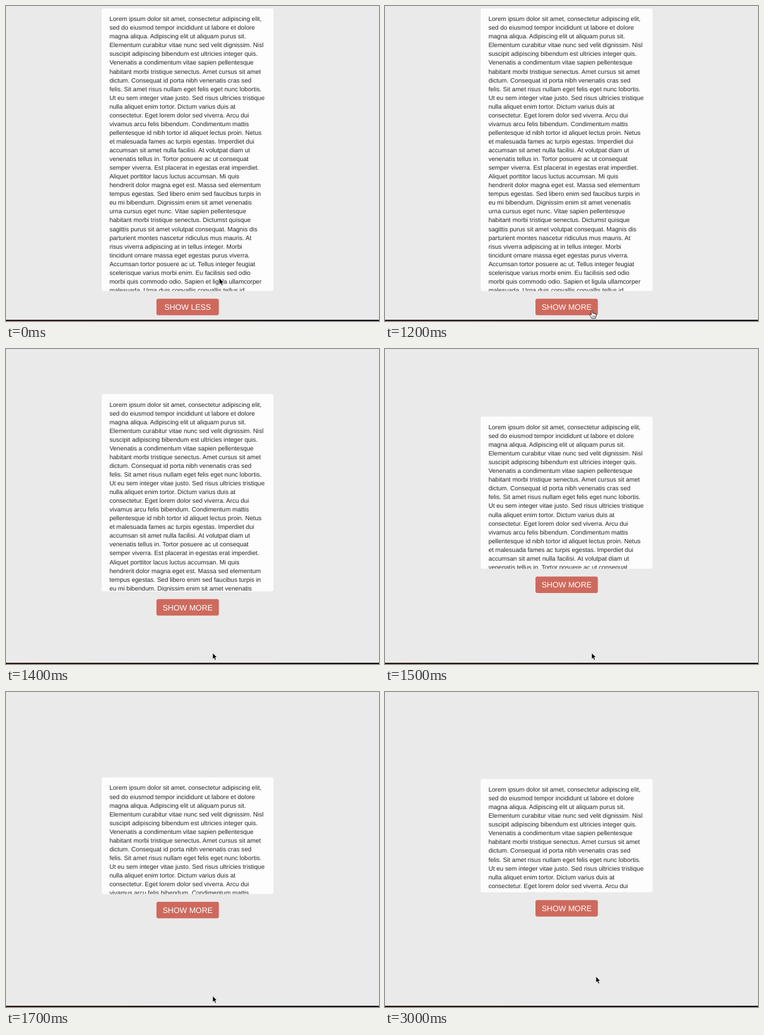
Recreate the animation shown at these times as an HTML page. Size 600 by 506 pixels, loop 3100 ms.

```html
<!DOCTYPE html>
<html lang="en">
<head>
<meta charset="utf-8">
<title>Show more / show less</title>
<style>
  html, body { margin: 0; width: 100%; height: 100%; overflow: hidden; background: #ebeaeb; }
  svg { display: block; width: 600px; height: 506px; }
  text { font-family: "Liberation Sans", Arial, sans-serif; text-rendering: geometricPrecision; }
  #lines { font-size: 10.05px; fill: #242424; }
  #label { font-size: 12.6px; fill: #fff; text-anchor: middle; }
</style>
</head>
<body>
<svg viewBox="0 0 600 506">
  <defs>
    <clipPath id="cardClip"><rect id="clipRect" x="154" width="276.3" rx="3"/></clipPath>
    <linearGradient id="edge">
      <stop offset="0" stop-color="#2b1714"/>
      <stop offset="1" stop-color="#121014"/>
    </linearGradient>
  </defs>
  <rect width="600" height="506" fill="#ebeaeb"/>
  <rect y="504" width="600" height="2" fill="url(#edge)"/>
  <rect id="card" x="154" width="276.3" rx="3" fill="#fefdfe"/>
  <g clip-path="url(#cardClip)"><g id="lines"></g></g>
  <g id="button">
    <rect x="242" width="100.4" height="26.5" rx="3" fill="#ce6a5d"/>
    <text id="label" x="292.2" y="17.7"></text>
  </g>
  <g id="cursor" stroke-linejoin="round">
    <path id="arrow" d="M0 0V10.4L2.4 8.2L4 12L5.9 11.2L4.3 7.5H7.4Z"
      fill="#000" stroke="#fff" stroke-width=".8"/>
    <g id="beam" fill="none">
      <path d="M-3-7Q0-7 0-5Q0-7 3-7M0-5V5M-3 7Q0 7 0 5Q0 7 3 7M-1.5 2H1.5" stroke="#fff" stroke-width="2"/>
      <path d="M-3-7Q0-7 0-5Q0-7 3-7M0-5V5M-3 7Q0 7 0 5Q0 7 3 7M-1.5 2H1.5" stroke="#222" stroke-width="1"/>
    </g>
    <g id="hand" stroke="#111" stroke-width=".9">
      <path d="M-1.1 7.2V.7Q-1.1-.5 0-.5T1.1 .7V4.4Q1.8 3.5 3 4.7Q4 4 4.9 5.2Q6.6 4.8 6.7 6.6V8.4Q6.6 10 5.5 11.2V12.5H-.4V11.6Q-2.2 9.6-3.9 7.1Q-4.4 5.9-3.2 5.7Q-2.2 5.7-1.1 7.2Z" fill="#fff"/>
      <path d="M1.3 8V10.7M3 8V10.7M4.6 8V10.7" stroke-width=".6"/>
    </g>
  </g>
</svg>
<script>
const LOOP = 3100, STEP = 100;
const CENTER = 230.8, OPEN = 453.8, CLOSED = 182, LINE = 14.055;
const copy = `Lorem ipsum dolor sit amet, consectetur adipiscing elit,
sed do eiusmod tempor incididunt ut labore et dolore
magna aliqua. Adipiscing elit ut aliquam purus sit.
Elementum curabitur vitae nunc sed velit dignissim. Nisl
suscipit adipiscing bibendum est ultricies integer quis.
Venenatis a condimentum vitae sapien pellentesque
habitant morbi tristique senectus. Amet cursus sit amet
dictum. Consequat id porta nibh venenatis cras sed
felis. Sit amet risus nullam eget felis eget nunc lobortis.
Ut eu sem integer vitae justo. Sed risus ultricies tristique
nulla aliquet enim tortor. Dictum varius duis at
consectetur. Eget lorem dolor sed viverra. Arcu dui
vivamus arcu felis bibendum. Condimentum mattis
pellentesque id nibh tortor id aliquet lectus proin. Netus
et malesuada fames ac turpis egestas. Imperdiet dui
accumsan sit amet nulla facilisi. At volutpat diam ut
venenatis tellus in. Tortor posuere ac ut consequat
semper viverra. Est placerat in egestas erat imperdiet.
Aliquet porttitor lacus luctus accumsan. Mi quis
hendrerit dolor magna eget est. Massa sed elementum
tempus egestas. Sed libero enim sed faucibus turpis in
eu mi bibendum. Dignissim enim sit amet venenatis
urna cursus eget nunc. Vitae sapien pellentesque
habitant morbi tristique senectus. Dictumst quisque
sagittis purus sit amet volutpat consequat. Magnis dis
parturient montes nascetur ridiculus mus mauris. At
risus viverra adipiscing at in tellus integer. Morbi
tincidunt ornare massa eget egestas purus viverra.
Accumsan tortor posuere ac ut. Tellus integer feugiat
scelerisque varius morbi enim. Eu facilisis sed odio
morbi quis commodo odio. Sapien et ligula ullamcorper
malesuada. Urna duis convallis convallis tellus id`;

const $ = id => document.getElementById(id);
const clamp = x => Math.min(1, Math.max(0, x));
const progress = (t, from, to) => clamp((t - from) / (to - from));
const smooth = x => x * x * (3 - 2 * x);
const mix = (a, b, k) => a + (b - a) * k;
const bezier = (a, b, s) => 3 * a * s * (1 - s) ** 2 + 3 * b * s * s * (1 - s) + s ** 3;

// CSS "ease": cubic-bezier(.25, .1, .25, 1)
function ease(x) {
  let lo = 0, hi = 1;
  for (let i = 0; i < 24; i++) {
    const mid = (lo + hi) / 2;
    if (bezier(.25, .25, mid) < x) lo = mid; else hi = mid;
  }
  return bezier(.1, 1, lo);
}

copy.split("\n").forEach((line, i) => {
  const text = document.createElementNS("http://www.w3.org/2000/svg", "text");
  text.setAttribute("x", 166.4);
  text.setAttribute("y", 20.3 + i * LINE);
  text.textContent = line;
  $("lines").append(text);
});

function cursorAt(t) {
  if (t < 100) return ["arrow", 343, 437];
  if (t < 1300) {
    const k = smooth(progress(t, 300, 900));
    const y = mix(442, 489.3, k);
    return [y < 457 ? "beam" : y < 470 ? "arrow" : "hand", mix(342, 333, k), y];
  }
  const k = smooth(progress(t, 1700, 2100));
  return ["arrow", mix(332.3, 339.2, k), mix(488, 456.7, k)];
}

function draw(time) {
  const t = Math.floor(time % LOOP / STEP) * STEP;
  const height = mix(OPEN, CLOSED, ease(progress(t, 1232, 1802)));
  const top = CENTER - height / 2;
  for (const id of ["card", "clipRect"]) {
    $(id).setAttribute("y", top);
    $(id).setAttribute("height", height);
  }
  $("lines").setAttribute("transform", `translate(0 ${top})`);
  $("button").setAttribute("transform", `translate(0 ${top + height + 12.5})`);
  $("label").textContent = t < 1200 ? "SHOW LESS" : "SHOW MORE";

  const [kind, x, y] = cursorAt(t);
  $("cursor").setAttribute("transform", `translate(${x} ${y})`);
  for (const id of ["arrow", "beam", "hand"])
    $(id).style.display = id === kind ? "" : "none";
}

const start = performance.now();
function tick() {
  draw(performance.now() - start);
  requestAnimationFrame(tick);
}
tick();
</script>
</body>
</html>
```
